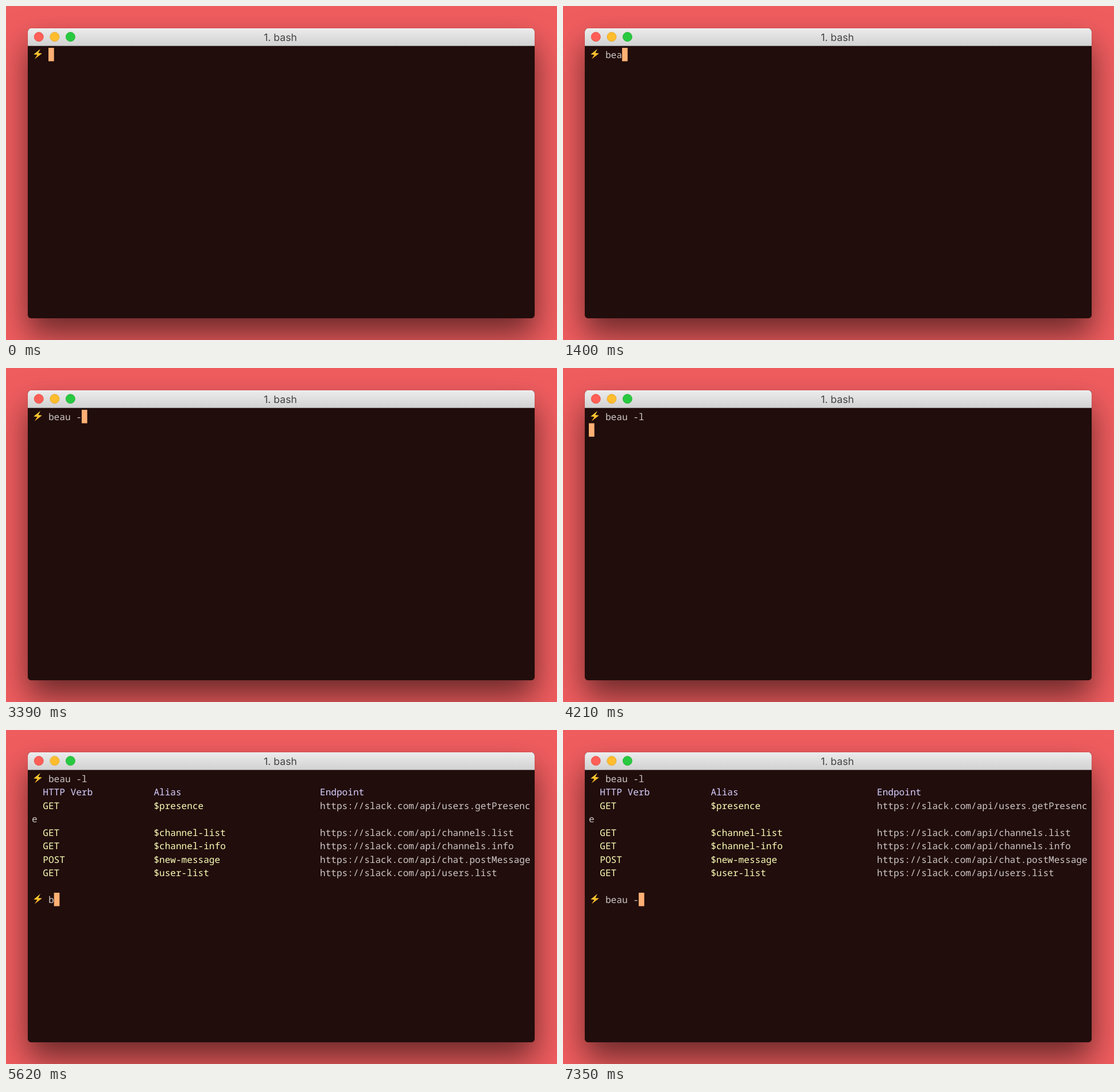
An HTML page for the animation above (8000 ms loop, 960 by 583 pixels).

```html
<!DOCTYPE html>
<html lang="en">
<head>
<meta charset="utf-8">
<title>Terminal</title>
<style>
  html, body { margin: 0; width: 100%; height: 100%; overflow: hidden; background: #f05d5f; }
  .window {
    position: absolute; left: 38px; top: 39px; width: 883px; height: 506px;
    box-sizing: border-box; border-radius: 6px; background: #200d0c;
    box-shadow: 0 0 1px rgba(0, 0, 0, .6), 0 28px 54px rgba(0, 0, 0, .55);
    overflow: hidden;
  }
  .bar {
    height: 30px; border-bottom: 1px solid #999;
    background: linear-gradient(#ececec, #d2d2d2);
    box-shadow: inset 0 1px #f6f6f6;
  }
  svg { position: absolute; left: 0; top: 0; }
  text { font: 16.09px "Noto Sans Mono", monospace; text-rendering: geometricPrecision; fill: #cfc8c6; }
  .title { font: 17.6px Inter, sans-serif; fill: #424242; text-anchor: middle; }
  .head { fill: #dad0ff; }
  .key { fill: #ffffb8; }
</style>
</head>
<body>
<div class="window"><div class="bar"></div></div>
<svg id="stage" width="960" height="583">
  <defs>
    <linearGradient id="gold" x2="0" y2="1">
      <stop stop-color="#ffd83a"/><stop offset="1" stop-color="#ffae20"/>
    </linearGradient>
    <path id="bolt" fill="url(#gold)" d="M60 75 48.2 84.6 54.6 85.3 49.8 92.8 62.8 82.8 56.2 82.1Z"/>
  </defs>
  <circle cx="57.2" cy="53.8" r="8" fill="#ff5f57" stroke="#e0443e" stroke-width=".8"/>
  <circle cx="84.8" cy="53.8" r="8" fill="#ffbd2e" stroke="#dfa023" stroke-width=".8"/>
  <circle cx="112.3" cy="53.8" r="8" fill="#28c940" stroke="#1aab29" stroke-width=".8"/>
  <text class="title" x="478" y="60.6">1. bash</text>
  <use href="#bolt"/>
  <g id="output"></g>
</svg>
<script>
const LOOP = 8000, CELL = 9.654, ROW = 23.45, LEFT = 45, TOP = 73;
const ENTER = 4210, REPLY = 4620;
const firstKeys = [1160, 1240, 1400, 1650, 1810, 3390, 4050];
const secondKeys = [5620, 6280, 6360, 6610, 6690, 7350];
const command = "beau -l";
const api = "https://slack.com/api/";
const table = [
  ["HTTP Verb", "Alias", "Endpoint"],
  ["GET", "$presence", api + "users.getPresence"],
  null,
  ["GET", "$channel-list", api + "channels.list"],
  ["GET", "$channel-info", api + "channels.info"],
  ["POST", "$new-message", api + "chat.postMessage"],
  ["GET", "$user-list", api + "users.list"],
];
const columns = [2, 22, 52], width = 90;
const stage = document.getElementById("stage");
const output = document.getElementById("output");

function add(parent, tag, attrs, content = "") {
  const el = document.createElementNS("http://www.w3.org/2000/svg", tag);
  for (const name in attrs) el.setAttribute(name, attrs[name]);
  el.textContent = content;
  return parent.appendChild(el);
}

function print(parent, row, col, content, style = "") {
  const x = LEFT + col * CELL, y = TOP + 17.9 + row * ROW;
  return add(parent, "text", { x, y, class: style }, content);
}

table.forEach((cells, i) => cells && cells.forEach((cell, j) => {
  const style = i === 0 ? "head" : j < 2 ? "key" : "";
  const room = width - columns[j];
  print(output, i + 1, columns[j], cell.slice(0, room), style);
  if (cell.length > room) print(output, i + 2, 0, cell.slice(room), style);
}));
add(output, "use", { href: "#bolt", y: 9 * ROW });

const first = print(stage, 0, 3, "");
const second = print(stage, 9, 3, "");
const cursor = add(stage, "rect", { width: CELL, height: ROW, fill: "#ffb074" });

const typed = (keys, t) => keys.filter(k => k <= t).length;

function draw(now) {
  const t = now % LOOP;
  const a = typed(firstKeys, t), b = typed(secondKeys, t);
  first.textContent = command.slice(0, a);
  second.textContent = command.slice(0, b);
  output.style.display = t < REPLY ? "none" : "";
  const [row, col] = t < ENTER ? [0, 3 + a] : t < REPLY ? [1, 0] : [9, 3 + b];
  cursor.setAttribute("x", LEFT + col * CELL);
  cursor.setAttribute("y", TOP + row * ROW);
  requestAnimationFrame(draw);
}
draw(performance.now());
</script>
</body>
</html>
```
